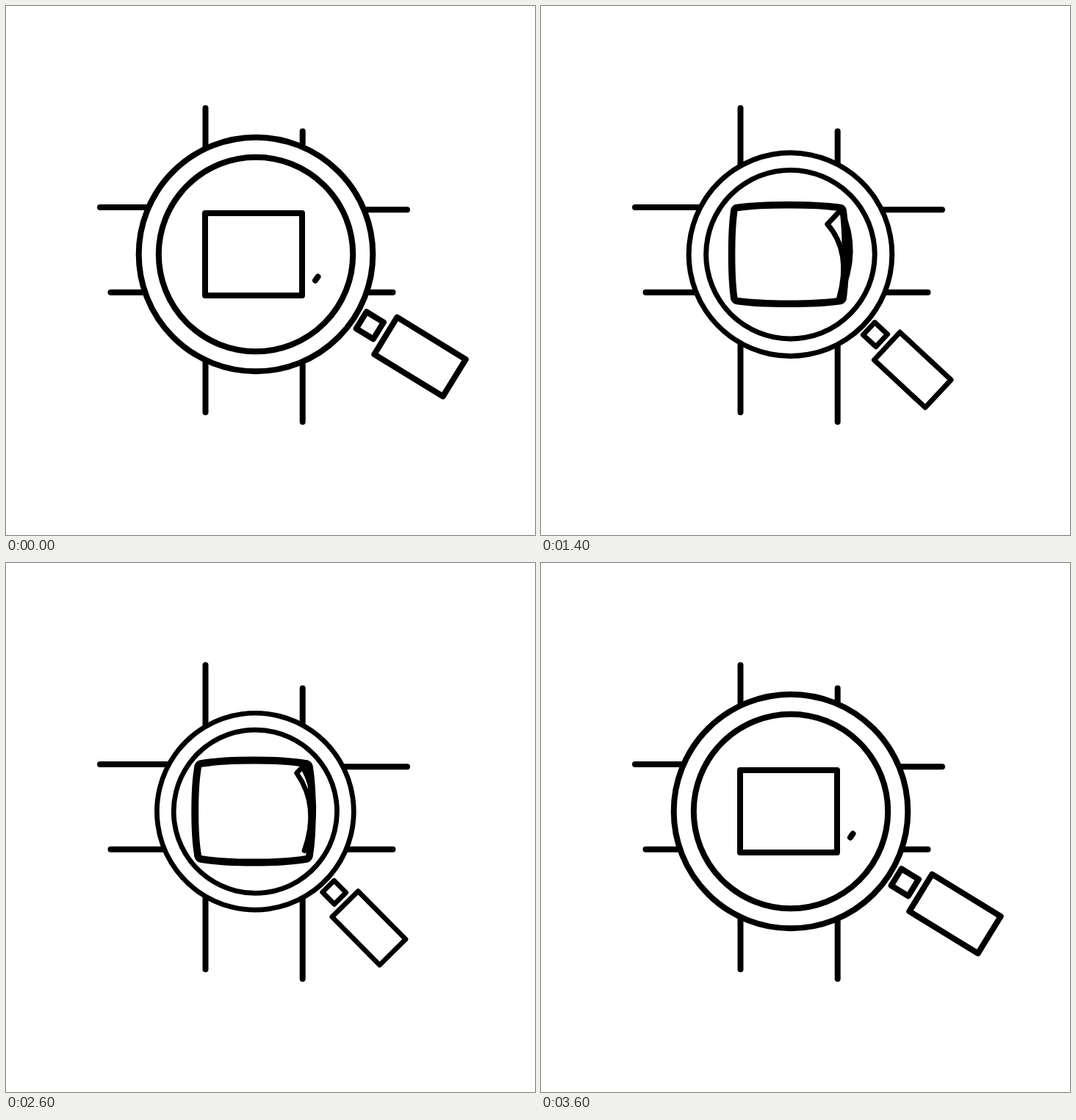
Write an HTML page that moves like this. It is 720 px wide and 720 px high and loops after 4000 ms.

```html
<!DOCTYPE html>
<html lang="en">
<head>
<meta charset="utf-8">
<title>Magnifier</title>
<style>
html, body { margin: 0; width: 100%; height: 100%; overflow: hidden; background: #fff; }
svg { display: block; width: 100%; height: 100%; }
path, circle, rect { stroke: #000; stroke-width: 8; stroke-linecap: round; stroke-linejoin: round; }
</style>
</head>
<body>
<svg viewBox="0 0 720 720">
  <path fill="none" d="M271.5 139V553M403.700 170.500V566M128 274H340M340 277.200H546M142.500 389.700H526.500"/>
  <g id="lens" fill="#fff">
    <circle r="159.300"/>
    <circle r="132.200"/>
    <g transform="rotate(31.500)">
      <rect x="169.300" y="-12" width="27.300" height="26.700"/>
      <rect x="208.700" y="-27.500" width="109.500" height="59.300"/>
    </g>
  </g>
  <path id="page" fill="none" transform="translate(337 338)"/>
  <path id="shine" fill="none"/>
</svg>
<script>
const LOOP = 4000, STEP = 100, START = 585, HALF = 1500;
const lens = document.getElementById('lens');
const page = document.getElementById('page');
const shine = document.getElementById('shine');

const clamp = v => Math.max(0, Math.min(1, v));
const add = (p, x, y) => [p[0] + x, p[1] + y];
const mid = (a, b) => [(a[0] + b[0]) / 2, (a[1] + b[1]) / 2];
// Control point of a quadratic that passes through m halfway from a to b
const bend = (a, m, b) => a.map((v, i) => 2 * m[i] - (v + b[i]) / 2);

// Rectangle whose sides bulge and corners soften as u grows
function pagePath(u) {
  const x = 66 + 15.5 * u, y = 56 + 14.2 * u;
  const ix = x - 11 * u, iy = y - 11 * u;
  const hx = (4 * (66 + 21 * u) - x) / 3, hy = (4 * (56 + 20.6 * u) - y) / 3;
  const cx = ix / 2, cy = iy / 2;
  return `M${-ix} ${-y}C${-cx} ${-hy} ${cx} ${-hy} ${ix} ${-y}Q${x} ${-y} ${x} ${-iy}` +
    `C${hx} ${-cy} ${hx} ${cy} ${x} ${iy}Q${x} ${y} ${ix} ${y}` +
    `C${cx} ${hy} ${-cx} ${hy} ${-ix} ${y}Q${-x} ${y} ${-x} ${iy}` +
    `C${-hx} ${cy} ${-hx} ${-cy} ${-x} ${-iy}Q${-x} ${-y} ${-ix} ${-y}Z`;
}

// Crescent that grows out of a dash, opens quickly and closes slowly
function shinePath(u, p) {
  const grow = clamp(u / 0.4);
  const width = 20 * clamp(Math.min(p / 0.28, (0.84 - p) / 0.4));
  const top = [424.5 - 36 * u ** 1.3, 368.5 - 91 * clamp(u / 0.52)];
  const end = [421 - 15 * grow, 373.5 + 23 * (1 - Math.abs(u / 0.54 - 1))];
  const tip = add(top, -0.95 * width, width);
  const outer = add(mid(top, end), 14 * grow, -2 * grow);
  const inner = add(outer, -0.55 * width, 0.3 * width);
  return `M${tip}L${top}Q${bend(top, outer, end)} ${end}Q${bend(end, inner, tip)} ${tip}Z`;
}

function draw(now) {
  const t = Math.floor((now % LOOP) / STEP) * STEP;
  const p = clamp((t - START) / (2 * HALF));
  const u = 1 - Math.abs(2 * p - 1);
  const scale = 1 - 0.2425 * u;
  lens.setAttribute('transform',
    `translate(${340 - u} ${338 + 0.3 * u}) rotate(${21 * u}) scale(${scale})`);
  page.setAttribute('d', pagePath(u));
  page.style.strokeWidth = 8 + 2.8 * u;
  shine.setAttribute('d', shinePath(u, p));
  shine.style.strokeWidth = 8 * scale;
}

const start = performance.now();
function tick() {
  draw(performance.now() - start);
  requestAnimationFrame(tick);
}
tick();
</script>
</body>
</html>
```
